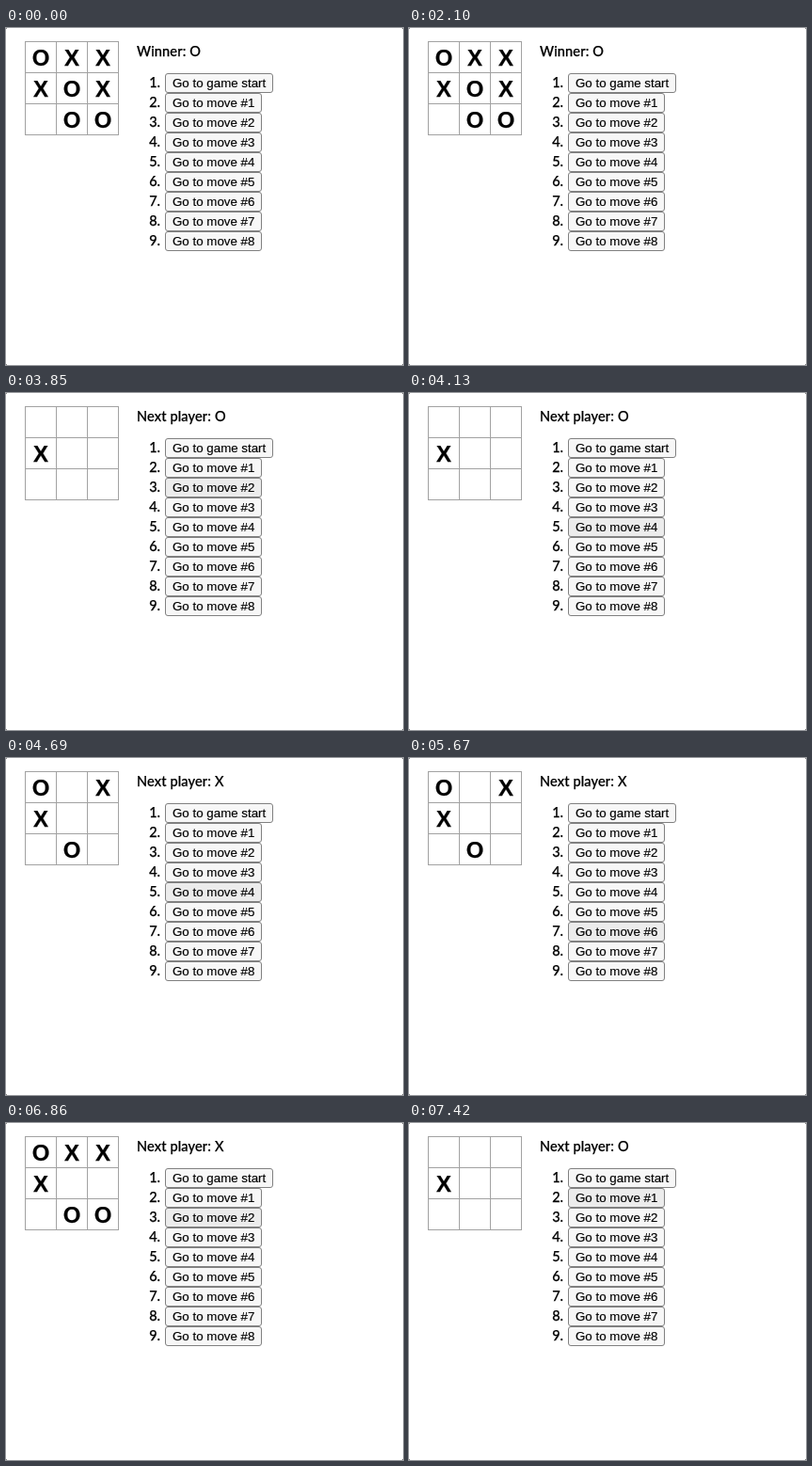
Write an HTML page that moves like this. It is 422 by 358 pixels and loops after 7.7 s.

```html
<!DOCTYPE html>
<html lang="en">
<head>
<meta charset="utf-8">
<title>Tic-tac-toe history</title>
<style>
  html, body { margin: 0; width: 100%; height: 100%; overflow: hidden; background: #fff; }
  svg { display: block; }
  text { fill: #000; stroke: #000; stroke-width: .25px; white-space: pre; }
  .mark { font: bold 24px "Liberation Sans", Arial, sans-serif; text-anchor: middle; }
  .label { font: 13.333px "Liberation Sans", Arial, sans-serif; stroke-width: .15px; }
  .info { font: 500 14.5px Lato, sans-serif; letter-spacing: .15px; }
  .num { font: 500 14.5px Lato, sans-serif; text-anchor: end; }
</style>
</head>
<body>
<svg id="stage" width="422" height="358" viewBox="0 0 422 358"></svg>
<script>
const LOOP = 7700, PRESS = 70;
const IDLE = '#f7f7f7', HOVER = '#ececec', PRESSED = '#f5f5f5';
const stage = document.getElementById('stage');

function add(tag, attrs, text = '') {
  const el = document.createElementNS('http://www.w3.org/2000/svg', tag);
  for (const key in attrs) el.setAttribute(key, attrs[key]);
  el.textContent = text;
  stage.appendChild(el);
  return el;
}

// Window corners
for (const x of [0, 421])
  for (const y of [0, 357])
    add('rect', { x, y, width: 1, height: 1, fill: '#888' });

// Board
for (let i = 0; i < 4; i++) {
  const p = i * 33;
  add('rect', { x: 20 + p, y: 14, width: 1, height: 100, fill: '#a2a2a2' });
  add('rect', { x: 20, y: 14 + p, width: 100, height: 1, fill: '#a2a2a2' });
}
const cells = Array.from({ length: 9 }, (_, i) =>
  add('text', { class: 'mark', x: 37 + i % 3 * 33, y: 40 + Math.floor(i / 3) * 33 }));

const info = add('text', { class: 'info', x: 139, y: 30 });

// Move list
const buttons = Array.from({ length: 9 }, (_, i) => {
  const y = 48 + i * 21;
  add('text', { class: 'num', x: 164, y: y + 15 }, `${i + 1}.`);
  const box = add('rect', {
    x: 169.5, y: y + .5, width: i ? 102 : 114, height: 20, rx: 2.5, stroke: '#808080'
  });
  add('text', { class: 'label', x: 177, y: y + 15 }, i ? `Go to move #${i}` : 'Go to game start');
  return box;
});

// Board cell chosen in each turn; X goes first
const moves = [3, 0, 2, 7, 1, 8, 5, 4];

// The pointer sets off, reaches a button and clicks it
const visits = [
  { go: 2170, arrive: 2170, button: 1, click: 2310 },
  { go: 3850, arrive: 4130, button: 4, click: 4690 },
  { go: 5460, arrive: 5670, button: 6, click: 6160 },
  { go: 6580, arrive: 7000, button: 1, click: 7350 }
];

// Crosses the buttons one by one, slowing down on the way
function hovered(t, visit, from) {
  const p = t < visit.arrive ? (t - visit.go) / (visit.arrive - visit.go) : 1;
  const way = visit.button - from;
  const crossed = 1 + Math.floor((Math.abs(way) - 1) * Math.sqrt(p));
  return from + Math.sign(way) * crossed;
}

function draw(t) {
  const n = visits.findLastIndex(v => v.go <= t);
  const visit = visits[n];
  const from = n > 0 ? visits[n - 1].button : 0;
  const active = visit ? hovered(t, visit, from) : -1;
  const pressed = visit && t >= visit.click - PRESS && t < visit.click;
  const turn = visits.findLast(v => v.click <= t)?.button ?? moves.length;

  cells.forEach((cell, i) => {
    const k = moves.indexOf(i);
    cell.textContent = k < 0 || k >= turn ? '' : 'XO'[k % 2];
  });
  info.textContent = turn === moves.length ? 'Winner: O' : 'Next player: ' + 'XO'[turn % 2];
  buttons.forEach((box, i) =>
    box.setAttribute('fill', i !== active ? IDLE : pressed ? PRESSED : HOVER));
}

const start = performance.now();
function tick() {
  draw((performance.now() - start) % LOOP);
  requestAnimationFrame(tick);
}
tick();
</script>
</body>
</html>
```
